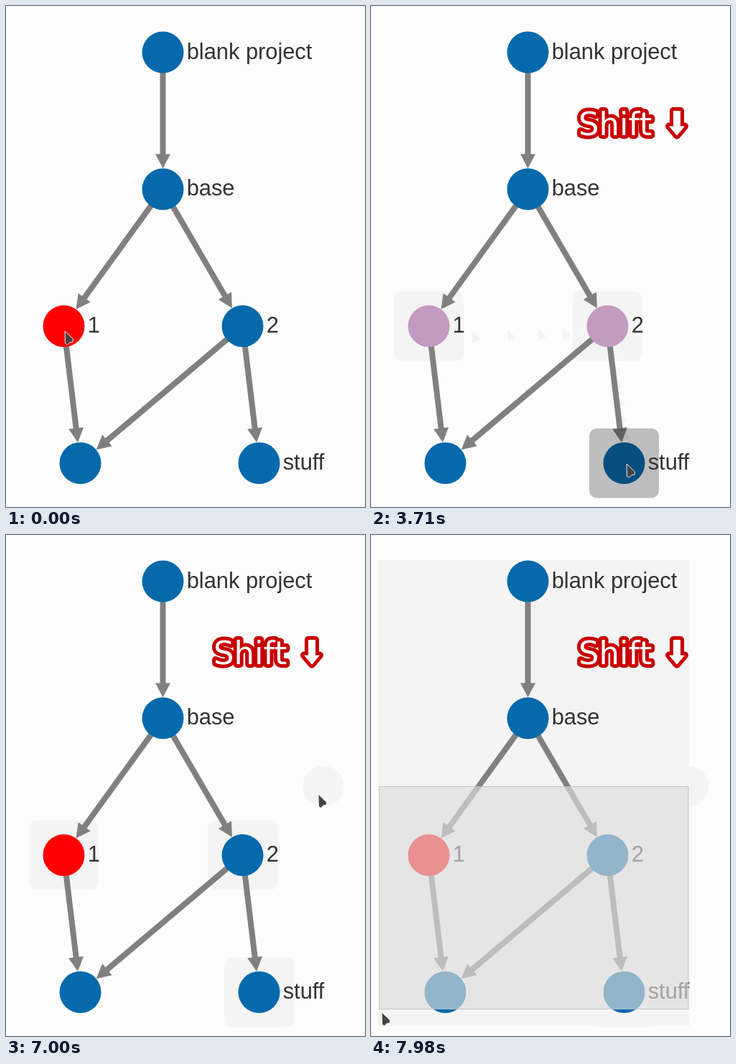
These frames come from a looping animation (500 by 698 pixels, 8000 ms). An HTML page with a canvas:

```html
<!DOCTYPE html>
<html lang="en">
<head>
<meta charset="utf-8">
<title>Graph selection</title>
<style>
html, body { margin: 0; width: 100%; height: 100%; overflow: hidden; background: #fcfcfc; }
canvas { display: block; }
</style>
</head>
<body>
<canvas id="stage" width="500" height="698"></canvas>
<script>
const ctx = document.getElementById('stage').getContext('2d');
const LOOP = 8000, STEP = 70, HOLD = 140, R = 29;
const BG = '#fcfcfc', TRACE = '#f4f4f4', BLUE = '#0569ab', RED = '#f00', PINK = '#c39ac0';
const SHIFT_DOWN = 910, BG_PRESS = 5110, BG_RELEASE = 5460, DRAG_PRESS = 6510, DRAG = 6930;
const anchor = { x: 442, y: 350 };

const node = (x, row, label, press = Infinity, color = BLUE) =>
  ({ x, y: 64.5 + 190.8 * row, label, press, color });
const root = node(218.5, 0, 'blank project');
const base = node(218.5, 1, 'base');
const one = node(80.5, 2, '1', 1120, RED);
const two = node(329.5, 2, '2', 2240);
const merge = node(103.5, 3, '');
const stuff = node(352.5, 3, 'stuff', 3640);
const nodes = [root, base, one, two, merge, stuff];
const edges = [[root, base], [base, one], [base, two], [one, merge], [two, merge], [two, stuff]];

// pointer moves: each leg starts where the last one ended
const easeOut = u => u * (2 - u);
const smooth = u => u * u * (3 - 2 * u);
const home = { x: 82, y: 453 };
const legs = [
  { start: 1680, end: 2240, x: 328, y: 445, ease: easeOut },
  { start: 2590, end: 3430, x: 356, y: 638, ease: smooth },
  { start: 4270, end: 4970, x: 445, y: 354, ease: easeOut },
  { start: DRAG, end: DRAG + 770, x: 15, y: 665, ease: smooth },
];

function pointerAt(t) {
  return legs.reduce((p, leg) => {
    const u = Math.min(1, Math.max(0, (t - leg.start) / (leg.end - leg.start)));
    const k = leg.ease(u);
    return { x: p.x + (leg.x - p.x) * k, y: p.y + (leg.y - p.y) * k };
  }, home);
}

function polygon(points, fill) {
  ctx.beginPath();
  points.forEach(([x, y]) => ctx.lineTo(x, y));
  ctx.closePath();
  ctx.fillStyle = fill;
  ctx.fill();
}

function disc({ x, y }, r, fill) {
  ctx.beginPath();
  ctx.arc(x, y, r, 0, 7);
  ctx.fillStyle = fill;
  ctx.fill();
}

function halo({ x, y }, fill) {
  ctx.beginPath();
  ctx.roundRect(x - 48.5, y - 48.5, 97, 97, 11);
  ctx.fillStyle = fill;
  ctx.fill();
}

function drawPointer({ x, y }, fill, outline) {
  ctx.save();
  ctx.translate(x, y);
  polygon([[0, 0], [11.5, 11], [11, 15], [7, 15.5], [3.5, 19], [.5, 17]], fill);
  ctx.strokeStyle = outline;
  ctx.lineWidth = 1;
  ctx.stroke();
  ctx.restore();
}

function drawEdge([a, b]) {
  const length = Math.hypot(b.x - a.x, b.y - a.y);
  ctx.save();
  ctx.translate(b.x, b.y);
  ctx.rotate(Math.atan2(b.y - a.y, b.x - a.x));
  ctx.fillStyle = '#808080';
  ctx.fillRect(-length, -4, length - R - 18, 8);
  polygon([[-R, 0], [-R - 20, -10.5], [-R - 20, 10.5]], '#808080');
  ctx.restore();
}

function drawNode(n, t) {
  const release = n.press + HOLD;
  disc(n, R, t >= release && t < BG_RELEASE ? PINK : n.color);
  if (t >= n.press && t < release) halo(n, 'rgba(0,0,0,.25)');
  ctx.font = '30.8px "Liberation Sans", Arial, sans-serif';
  ctx.fillStyle = '#333';
  ctx.fillText(n.label, n.x + 33.2, n.y + 9);
}

function drawShift() {
  ctx.save();
  ctx.font = '45px "DejaVu Sans", Verdana, sans-serif';
  ctx.strokeStyle = '#c80000';
  ctx.lineWidth = 10;
  ctx.lineJoin = 'round';
  ctx.strokeText('Shift', 289, 180);
  ctx.fillStyle = '#fff';
  ctx.fillText('Shift', 289, 180);
  ctx.translate(426, 180.5);
  const arrow = [[0, 0], [-11, -13], [-5, -13], [-5, -34.5], [5, -34.5], [5, -13], [11, -13]];
  polygon(arrow, '#fff');
  ctx.stroke();
  polygon(arrow, '#fff');
  ctx.restore();
}

// the selection box trails the pointer by one step
function marqueeAt(t) {
  const tip = pointerAt(t - STEP), x = tip.x - 4, y = tip.y - 4;
  return [x, anchor.y, anchor.x - x, y - anchor.y];
}

function drawTraces(t) {
  nodes.filter(n => t >= n.press + HOLD).forEach(n => halo(n, TRACE));
  if (t >= BG_RELEASE) disc(anchor, 28.5, TRACE);
  if (t < DRAG_PRESS) {
    for (const leg of legs)
      for (let s = leg.start + STEP; s < Math.min(t, leg.end); s += STEP)
        drawPointer(pointerAt(s), TRACE, BG);
  }
  if (t > DRAG + STEP) {
    ctx.fillStyle = BG;
    ctx.fillRect(...marqueeAt(t));
  }
  if (t >= DRAG + 840) {
    ctx.fillStyle = TRACE;
    ctx.fillRect(10, 35, 434, 649);
  }
}

function drawMarquee(t) {
  const [x, y, w, h] = marqueeAt(t);
  ctx.globalAlpha = .65;
  ctx.fillStyle = '#ddd';
  ctx.fillRect(x, y, w, h);
  ctx.strokeStyle = '#aab4ba';
  ctx.lineWidth = 1;
  ctx.strokeRect(x + .5, y + .5, w - .5, h - 1);
  ctx.globalAlpha = 1;
}

function draw(t) {
  ctx.fillStyle = BG;
  ctx.fillRect(0, 0, 500, 698);
  drawTraces(t);
  edges.forEach(drawEdge);
  nodes.forEach(n => drawNode(n, t));
  const pressed = (t >= BG_PRESS && t < BG_RELEASE) || (t >= DRAG_PRESS && t <= DRAG);
  if (pressed) disc(anchor, 28.5, 'rgba(0,0,0,.15)');
  if (t > DRAG + STEP) drawMarquee(t);
  if (t >= SHIFT_DOWN) drawShift();
  drawPointer(pointerAt(t), '#444', '#eee');
}

const start = performance.now();
function frame() {
  const t = (performance.now() - start) % LOOP;
  draw(Math.floor(t / STEP) * STEP);
  requestAnimationFrame(frame);
}
frame();
</script>
</body>
</html>
```
